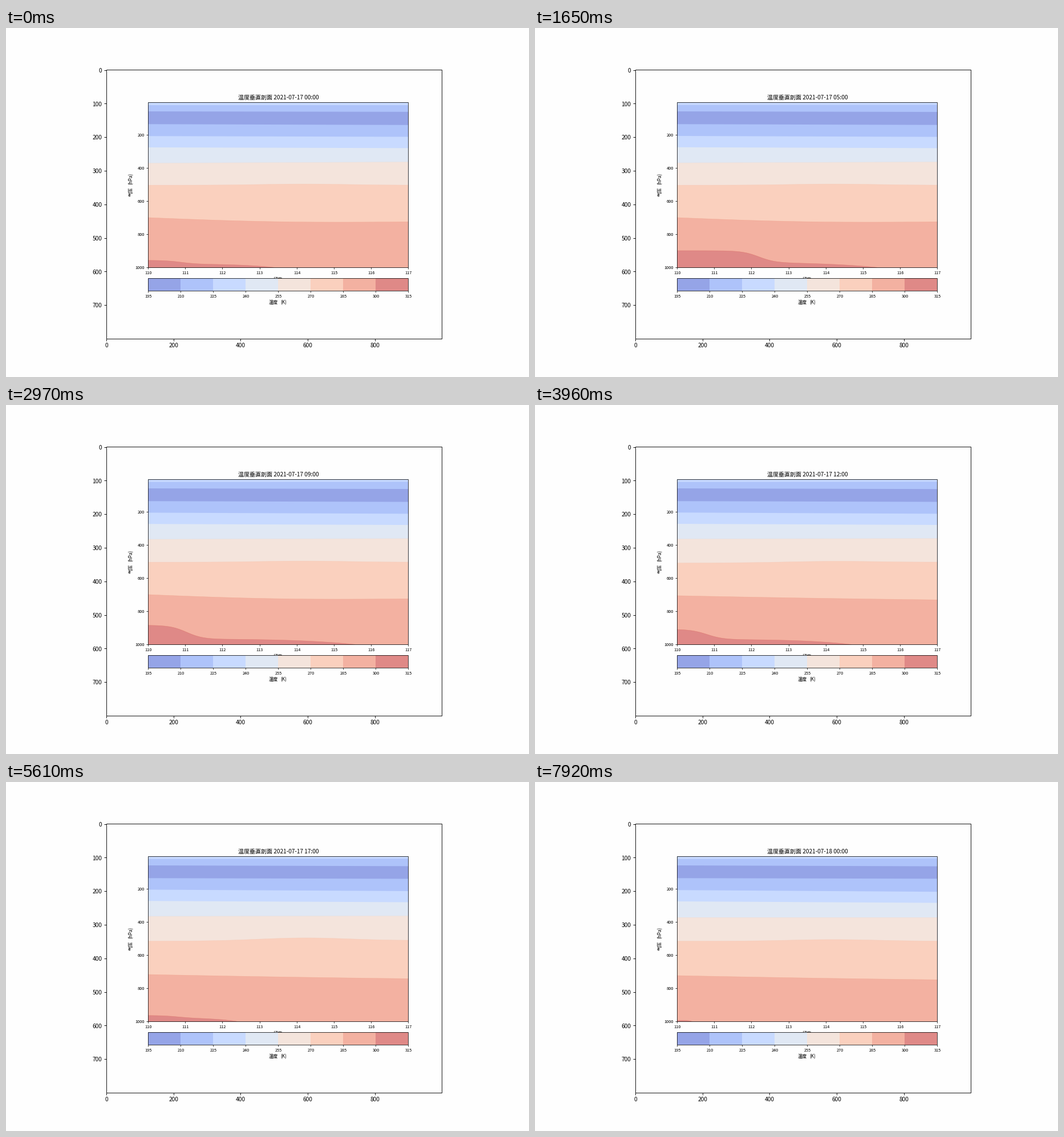
A matplotlib script that plays this animation: 917 px wide and 611 px high, repeating every 8000 ms.

```python
import numpy as np
import matplotlib
import matplotlib.pyplot as plt
from matplotlib.animation import FuncAnimation
from matplotlib.collections import LineCollection
from matplotlib.patches import Polygon, Rectangle

W, H, DPI = 917, 611, 64
PT = 72 / DPI                    # points per pixel
FONT = "Noto Sans CJK JP"
STEP, LOOP, HOUR_MS = 40, 8000, 330

# Stage pixels: outer frame, section, colour bar
OUT_L, OUT_R, OUT_T, OUT_B = 175.9, 764.0, 73.3, 543.8
LEFT, RIGHT, TOP, BOTTOM = 249.2, 705.2, 130, 419.4
BAR_TOP, BAR_BOTTOM = 438.2, 460.3
DEG = (RIGHT - LEFT) / 7
LON = np.linspace(0, 7, 113)
X = LEFT + LON * DEG

fig = plt.figure(figsize=(W / DPI, H / DPI), dpi=DPI, facecolor="#fefefe")
ax = fig.add_axes([0, 0, 1, 1])
ax.set_xlim(0, W)
ax.set_ylim(H, 0)
ax.axis("off")


def ramp(v, start, end):
    return np.clip((v - start) / (end - start), 0, 1)


def bell(v, centre, width):
    return np.exp(-((v - centre) / width) ** 2)


def layer(hour, west, swing, tilt, late_tilt):
    """Nearly straight isotherm: daily swing plus a slope that drifts."""
    slope = tilt + (late_tilt - tilt) * hour / 24
    return west + swing * np.cos(2 * np.pi * (hour - 1) / 24) + slope * LON / 7


def mid_level(hour):
    """270 K: sinks after 09:00 and keeps a ridge near 114 degrees."""
    west = 275.2 + 3.5 * ramp(hour, 9, 16)
    east = 275.2 + 3.5 * ramp(hour, 12, 20)
    ridge = (2 + 3.8 * bell(hour, 19, 4)) * bell(LON, 4.2, 1.7)
    return west + (east - west) * LON / 7 - ridge


def low_level(hour):
    """285 K: slopes down eastwards, bowed until noon."""
    bow = 3.5 - 3 * ramp(hour, 9, 12)
    return 332 + 7 * ramp(hour, 9, 20) + 7.3 * LON / 7 + bow * np.sin(np.pi * LON / 7)


def warm_pool(hour):
    """300 K: a daytime dome in the west on a shallow, wider shelf."""
    dome = 25 * bell(hour, 8, 7)
    edge = 0.8 + 1.4 * bell(hour, 5, 3)
    shelf = 10 * bell(hour, 8.5, 13)
    reach = 5.8 * bell(hour, 7.4, 10.4)
    return (420 - dome / (1 + np.exp((LON - edge) / 0.22))
            - shelf * (1 - (LON / reach) ** 4))


def isotherms(hour):
    return [layer(hour, 134.7, 0, 0, -1),
            layer(hour, 146, 0, 0.8, 1.6),
            layer(hour, 168.3, 0, 1.5, 1),
            layer(hour, 188.7, 0.5, 1.3, 3),
            layer(hour, 208.5, 0.5, 1.3, 2.6),
            layer(hour, 235.6, 1, -2, 0),
            mid_level(hour), low_level(hour), warm_pool(hour)]


def label(x, y, s, size, ha="center", **kw):
    return ax.text(x, y + 0.37 * size, s, family=FONT, fontsize=size * PT,
                   ha=ha, va="baseline", color="black", zorder=6, **kw)


def box(x0, y0, x1, y1, lw):
    ax.add_patch(Rectangle((x0, y0), x1 - x0, y1 - y0, fill=False,
                           ec="black", lw=lw * PT, zorder=5))


def ticks(segments, lw):
    ax.add_collection(LineCollection(segments, colors="black",
                                     linewidths=lw * PT, zorder=5))


# Eight temperature bands, the colour map at 60 % over white
INK = matplotlib.colormaps["coolwarm"]((np.arange(8) + 0.5) / 8)[:, :3]
BAND = 0.6 * INK + 0.4

# Outer frame
box(OUT_L, OUT_T, OUT_R, OUT_B, 0.9)
unit = (OUT_R - OUT_L) / 1000
marks = []
for v in range(0, 1000, 200):
    x = OUT_L + (v + 0.5) * unit
    marks.append([(x, OUT_B), (x, OUT_B + 4)])
    label(x, 555.2, str(v), 10.1)
for v in range(0, 800, 100):
    y = OUT_T + (v + 0.5) * unit
    marks.append([(OUT_L - 4, y), (OUT_L, y)])
    label(168.3, y + 0.4, str(v), 10.1, ha="right")
ticks(marks, 0.9)

# Section and colour bar
SMALL, EM = 7.35, 8.17
marks = []
for i in range(8):
    x = LEFT + i * DEG
    marks.append([(x, BOTTOM), (x, BOTTOM + 3)])
    label(x + 0.3, 428.3, str(110 + i), SMALL)
for v in range(200, 1001, 200):
    y = BOTTOM - (1000 - v) * 0.29
    marks.append([(LEFT - 3, y), (LEFT, y)])
    label(243, y + 0.2, str(v), SMALL, ha="right")
step = (RIGHT - LEFT) / 8
for i in range(9):
    x = LEFT + i * step
    marks.append([(x, BAR_BOTTOM), (x, BAR_BOTTOM + 3)])
    label(x + 0.3, 469, str(195 + 15 * i), SMALL)
    if i < 8:
        ax.add_patch(Rectangle((x, BAR_TOP), step, BAR_BOTTOM - BAR_TOP,
                               fc=BAND[i], lw=0, zorder=4))
ticks(marks, 0.75)
box(LEFT, TOP, RIGHT, BOTTOM, 0.75)
box(LEFT, BAR_TOP, RIGHT, BAR_BOTTOM, 0.75)

label(477.3, 440.2, "经度", EM).set_zorder(1)    # mostly hidden by the bar
label(461, 480, "温度", EM, ha="left")
label(487, 480, "(K)", EM)
for y, s in ((295.3, "气压"), (274.5, "(hPa)")):
    ax.text(218.6 + 0.37 * EM, y, s, family=FONT, fontsize=EM * PT, rotation=90,
            rotation_mode="anchor", ha="left", va="baseline", zorder=6)
title = label(478, 121.2, "", 10.05)

# Each band is painted from its upper edge down to the floor
ORDER = [2, 1, 0, 1, 2, 3, 4, 5, 6, 7]
ax.add_patch(Rectangle((LEFT, TOP), RIGHT - LEFT, BOTTOM - TOP,
                       fc=BAND[ORDER[0]], lw=0, zorder=2))
bands = [ax.add_patch(Polygon([(0, 0), (0, 1), (1, 1)], fc=BAND[k], lw=0, zorder=2))
         for k in ORDER[1:]]
# Faint darker seam where two translucent warm bands overlap
seams = [ax.plot([], [], color=0.6 * INK[k] + 0.4 * BAND[k - 1], lw=0.6 * PT,
                 alpha=0.6, zorder=3)[0] for k in ORDER[6:]]


def draw(i):
    hour = min(int((i + 0.5) * STEP // HOUR_MS), 24)
    curves = isotherms(hour)
    for band, y in zip(bands, curves):
        edge = np.column_stack([X, np.minimum(y, BOTTOM)])
        band.set_xy(np.vstack([edge, [(RIGHT, BOTTOM), (LEFT, BOTTOM)]]))
    for seam, y in zip(seams, curves[5:]):
        seam.set_data(X, np.where(y < BOTTOM, y, np.nan))
    title.set_text(f"温度垂直剖面 2021-07-{17 + hour // 24} {hour % 24:02d}:00")
    return [*bands, *seams, title]


anim = FuncAnimation(fig, draw, frames=LOOP // STEP, interval=STEP,
                     init_func=lambda: draw(0), repeat=True, repeat_delay=0)
plt.show()
```
